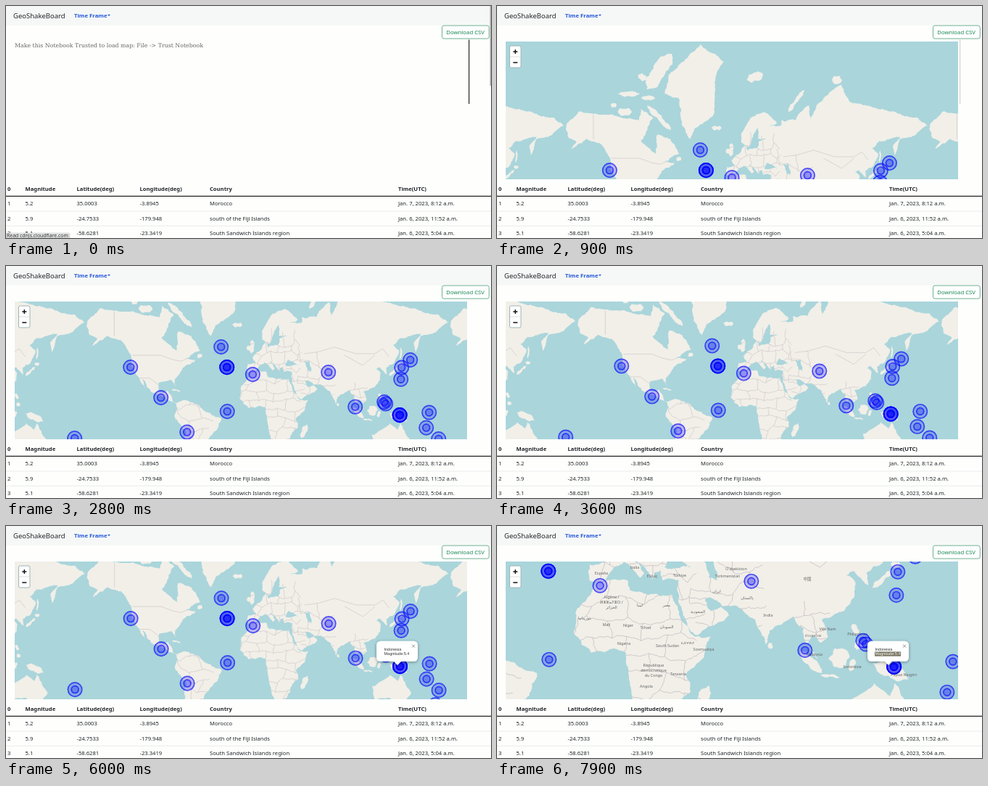
Recreate the animation shown at these times as an HTML page. Size 669 by 320 pixels, loop 8000 ms.

```html
<!DOCTYPE html>
<html lang="en">
<head>
<meta charset="utf-8">
<title>GeoShakeBoard</title>
<style>
html, body { margin: 0; width: 100%; height: 100%; overflow: hidden; background: #fefffd; }
svg { display: block; width: 669px; height: 320px; }
text { font-family: "Noto Sans", "Open Sans", sans-serif; font-size: 7.65px; fill: #212529; white-space: pre; }
.b { font-weight: 700; }
#labels text { font-family: "Noto Sans", "DejaVu Sans", "Noto Sans CJK SC", sans-serif; font-size: 5.4px; fill: #666; text-anchor: middle; }
#popup text { font-family: "Liberation Sans", Arial, sans-serif; font-size: 5.5px; fill: #333; }
</style>
</head>
<body>
<svg viewBox="0 0 669 320">
  <defs>
    <clipPath id="frame"><rect x="12" y="49" width="624" height="190"/></clipPath>
    <clipPath id="picked"><rect id="pick" x="521" y="173.2" width="0" height="6.6"/></clipPath>
    <clipPath id="inland"><use href="#land"/></clipPath>
    <filter id="shade" x="-20%" y="-20%" width="140%" height="150%"><feDropShadow dx="0" dy="1" stdDeviation="2" flood-opacity=".4"/></filter>
    <g id="ring" fill="#00f" fill-opacity=".22" stroke="#00f" stroke-opacity=".65" stroke-width="1.7"><circle r="9.7"/><circle r="4.9"/></g>
    <g id="world">
      <path id="land" fill="#f1efe8"/>
      <path id="borders" clip-path="url(#inland)" fill="none" stroke="#b3a3ad" stroke-opacity=".75" stroke-linejoin="round"/>
      <path id="lakes" fill="#aad5db"/>
    </g>
  </defs>
  <rect width="669" height="320" fill="#fefffd"/>
  <rect width="669" height="26.5" fill="#f6f8f7"/>
  <text x="10" y="17" style="font-size:9.5px">GeoShakeBoard</text>
  <text class="b" x="94" y="16" style="font-size:7.75px;fill:#2457dc">Time Frame</text>
  <path d="M140 11.8h4l-2 2.2z" fill="#2457dc"/>
  <rect x="601.5" y="27" width="64.8" height="18" rx="2.5" fill="#fff" stroke="#4a9c78" stroke-width=".8"/>
  <text x="607.3" y="39" style="font-size:7.75px;fill:#198754">Download CSV</text>
  <g id="table"></g>
  <rect id="scroll" x="638" y="46.5" width="1.3" height="88.5"/>
  <g id="loading">
    <rect x="667.6" width="1.4" height="110" fill="#aaa"/>
    <text x="12" y="57" style="font:7.85px 'DejaVu Serif',serif;fill:#666">Make this Notebook Trusted to load map: File -&gt; Trust Notebook</text>
    <path d="M0 313.2H86q2 0 2 2V320H0z" fill="#e3e5e4" stroke="#b9bbba" stroke-width=".5"/>
    <text x="1" y="319" style="font-size:6.9px;fill:#333">Read cdnjs.cloudflare.com</text>
  </g>
  <g id="map" clip-path="url(#frame)">
    <rect x="12" y="49" width="624" height="190" fill="#aad5db"/>
    <g id="view">
      <g id="tiles"><use href="#world" x="-501.5"/><use href="#world"/><use href="#world" x="501.5"/></g>
    </g>
    <g id="labels"></g>
    <g id="marks"></g>
    <g id="popup">
      <path filter="url(#shade)" fill="#fff" d="M517 158.7h45q6 0 6 6v16q0 6-6 6h-17l-5 5.3-5-5.3h-18q-6 0-6-6v-16q0-6 6-6z"/>
      <path d="M560 163.6l4 4m0-4l-4 4" stroke="#777" stroke-width=".8"/>
      <text x="521.5" y="171.5">Indonesia</text>
      <text x="521.5" y="178.4">Magnitude:5.4</text>
      <g clip-path="url(#picked)">
        <rect x="521" y="173.2" width="36" height="6.6" fill="#77745f"/>
        <text x="521.5" y="178.4" style="fill:#fff">Magnitude:5.4</text>
      </g>
    </g>
    <rect x="17.5" y="55" width="15.5" height="30" rx="2" fill="#fff" stroke="#9fb5b8"/>
    <path d="M18 70h14.5" stroke="#ccc" stroke-width=".6"/>
    <path d="M22.3 63h6M25.3 60v6M22.3 78h6" stroke="#111" stroke-width="1.4"/>
  </g>
</svg>
<script>
const $ = id => document.getElementById(id);
const SIZE = 501.5, R = SIZE / (2 * Math.PI);

// Corner points as "lon,lat"; the coast between them is roughened by rule.
const LAND = {
  africa: '-6,36 10,37 11,33 20,31 32,31 33,28 37,19 43,12 51,12 48,4 39,-6 41,-15 35,-20 33,-27 27,-34 18,-34 12,-17 9,-1 9,4 4,6 -8,4 -17,14 -16,23 -10,30',
  europe: '-9,37 -9,43 -1,44 -4,48 5,53 9,57 11,54 21,55 23,59 30,60 66,61 66,38 36,37 27,37 26,41 23,40 22,37 19,41 13,45 18,40 16,38 8,44 3,42 -1,37',
  nordic: '30,60 22,60 22,65 17,61 13,56 6,58 5,62 15,69 28,71 41,67 33,66 45,66 45,68 68,69 68,57 34,56',
  siberia: '60,69 72,73 74,68 80,73 104,78 113,74 140,72 180,69 190,66 178,62 163,60 157,51 156,57 163,61 142,59 135,55 141,52 135,43 100,38 60,40',
  east: '135,45 128,40 129,35 126,37 122,41 118,39 122,37 122,30 117,24 106,20 109,12 105,9 101,13 99,9 104,1 98,9 97,16 91,22 76,24 76,46',
  south: '92,22 80,15 78,8 73,20 66,25 57,26 50,30 48,29 51,24 56,26 60,22 45,13 43,13 35,28 35,37 45,46 95,46',
  north: '-168,66 -156,71 -128,70 -96,68 -94,72 -82,69 -94,59 -82,53 -79,52 -78,62 -65,60 -56,52 -70,47 -60,46 -70,42 -76,36 -81,31 -80,25 -84,30 -97,28 -97,20 -91,19 -88,21 -84,15 -83,10 -78,8 -85,11 -95,16 -105,20 -113,31 -110,23 -117,33 -124,41 -124,48 -135,58 -148,60 -163,55 -158,59 -166,61',
  latin: '-80,9 -72,12 -60,8 -50,0 -35,-6 -39,-17 -48,-26 -58,-36 -73,-38 -70,-18 -81,-5 -78,4',
  greenland: '-45,60 -40,65 -22,70 -19,80 -12,82 -35,84 -66,80 -70,76 -57,75 -53,66',
  australia: '114,-22 116,-34 131,-32 145,-38 153,-28 142,-11 140,-17 132,-11'
};
const LAKES = ['28,42 31,46 41,42', '47,45 53,45 54,37 50,38'];
// Long islands: two tips, then the width in pixels.
const ISLES = `-88,73 -64,64 7|-117,71 -103,71 10|-124,73 -118,73 6|-88,77 -64,83 20|-96,80 -89,79 9
-117,76 -95,76 6|-94,75 -80,75 5|-59,48 -54,49 5|-24,65 -14,65 6|11,79 27,80 12|52,71 68,77 6|95,79 105,79 10
-5,50 -4,58 6|-8,52 -8,55 5|131,34 141,41 4|140,43 145,43 4|142,46 143,54 2|-84,22 -75,20 2|44,-25 50,-12 7
80,9 81,6 3|121,18 124,13 4|122,7 126,8 5|95,5 106,-6 5|105,-7 115,-8 2|112,-3 117,6 12|120,-5 122,1 4|131,-1 149,-9 8`.split(/[|\n]/);
const LONG_BORDERS = ['-123,49 -95,49 -83,46 -75,45 -68,47', '-117,32 -106,32 -97,26', '-141,70 -141,60',
  '47,50 60,51 77,54 98,50 117,50 125,53 131,48', '87,49 105,42 117,49'];
// Regions with many countries: west, south, east, north, cell size in degrees.
const REGIONS = [[-17, -34, 45, 33, 9], [-9, 38, 42, 60, 6], [42, 16, 78, 46, 9], [90, 10, 108, 27, 6], [-76, -36, -46, 8, 10]];

// Offsets in pixels from 0°,0° at the first zoom level, with a repeat count.
const QUAKES = [
  [-174, -62], [-49, -90], [-41, -62, 3], [-5.4, -52], [-132, -20], [-40.5, -1], [-96, 27.5],
  [-251, 36], [99, -55], [136, -7.4], [176, -14], [178, -11.6], [197.4, 4, 4], [212, -72],
  [200, -61.5], [199, -45.4], [238, .4], [234, 21.5], [251, 37], [246, 57]
];
const LABELS = `España 144 67|Italia 190 59|Ελλάς 214 71|Türkiye 252 70|Oʻzbekiston 330 61|Türkmenistan 318 71
中国 428 75|Algérie / 158 100|ⵍⵣⵣⴰⵢⴻⵔ / 158 107|الجزائر 158 114|ليبيا 197 111|مصر 234 111|موريتانيا 121 129
Mali 151 138|Niger 181 139|Tchad 205 142|السودان 234 141|السعودية 277 120|ایران 303 92|پاکستان 345 101
India 374 125|ประเทศไทย 436 153|Việt Nam 456 144|Nigeria 175 164|South Sudan 235 167|ኢትዮጵያ 263 163
Soomaaliya 285 172|République 216 194|démocratique 216 201|du Congo 216 208|Tanzania 250 206|Angola 206 223
Philippines 497 151|Malaysia 438 179|Indonesia 490 196|Papua Niugini 561 207`.split(/[|\n]/);
const COLS = [2, 26.5, 97.5, 184.5, 281, 541];
const ROWS = [
  ['0', 'Magnitude', 'Latitude(deg)', 'Longitude(deg)', 'Country', 'Time(UTC)'],
  ['1', '5.2', '35.0003', '-3.8945', 'Morocco', 'Jan. 7, 2023, 8:12 a.m.'],
  ['2', '5.9', '-24.7533', '-179.948', 'south of the Fiji Islands', 'Jan. 6, 2023, 11:52 a.m.'],
  ['3', '5.1', '-58.6281', '-23.3419', 'South Sandwich Islands region', 'Jan. 6, 2023, 5:04 a.m.']
];
// Time, then where 0°,0° lies on the stage.
const DRAG = [[1000, 329.4, 288.6], [1700, 341.9, 217.6], [2300, 345.7, 201.6], [3400, 345.7, 201.6], [4300, 346.1, 189.6]];
const FOCUS = [539.35, 193];

let seed = 11;
const random = () => (seed = seed * 16807 % 2147483647) / 2147483647;
const wobble = size => (random() - .5) * size;

const mercator = (lon, lat) => [lon * SIZE / 360, -R * Math.asinh(Math.tan(lat * Math.PI / 180))];
const points = text => text.split(' ').map(pair => mercator(...pair.split(',').map(Number)));
const path = list => 'M' + list.map(p => p.map(v => v.toFixed(2)).join(' ')).join('L');

// Splits an edge at shifted midpoints until the pieces are short.
function rough(a, b) {
  const dx = b[0] - a[0], dy = b[1] - a[1], length = Math.hypot(dx, dy);
  if (length < 2) return [a];
  const shift = wobble(Math.min(.3, 2.5 / length));
  const mid = [a[0] + dx / 2 - dy * shift, a[1] + dy / 2 + dx * shift];
  return [...rough(a, mid), ...rough(mid, b)];
}
const coast = list => path(list.flatMap((p, i) => rough(p, list[(i + 1) % list.length]))) + 'z';

function isle(text) {
  const [from, to, width] = text.split(' ');
  const [a, b] = points(from + ' ' + to);
  const dx = b[0] - a[0], dy = b[1] - a[1], side = width / 2 / Math.hypot(dx, dy);
  const at = (u, s) => [a[0] + dx * u - dy * s, a[1] + dy * u + dx * s];
  // Keeps one winding for all land, so that overlaps stay filled.
  return coast([a, at(.2, side), at(.8, side), b, at(.8, -side), at(.2, -side)].reverse());
}

// Brick mesh with shifted corners, cut off at the coast.
function mesh([west, south, east, north, cell]) {
  const cols = Math.ceil((east - west) / cell), rows = Math.ceil((north - south) / cell);
  const node = Array.from({ length: cols + 1 }, (_, i) => Array.from({ length: rows + 1 }, (_, j) =>
    mercator(west + i * cell + wobble(cell * .7), south + j * cell + wobble(cell * .7))));
  let d = '';
  for (let i = 0; i < cols; i++) {
    for (let j = 0; j < rows; j++) {
      d += path([...rough(node[i][j], node[i + 1][j]), node[i + 1][j]]);
      if ((i + j) % 2) d += path([...rough(node[i][j], node[i][j + 1]), node[i][j + 1]]);
    }
  }
  return d;
}

const each = (list, make) => list.map(make).join('');
$('land').setAttribute('d', each(Object.values(LAND), s => coast(points(s))) + each(ISLES, isle));
$('lakes').setAttribute('d', each(LAKES, s => coast(points(s))));
$('borders').setAttribute('d', each(REGIONS, mesh) + each(LONG_BORDERS, s => path(points(s))));
$('marks').innerHTML = each(QUAKES, ([x, y, n = 1]) => `<use href="#ring" x="${x}" y="${y}"/>`.repeat(n));
$('labels').innerHTML = each(LABELS, s => s.replace(/(.+) (\d+) (\d+)$/, '<text x="$2" y="$3">$1</text>'));
$('table').innerHTML = each(ROWS, (row, r) => each(row, (s, c) =>
  `<text${r ? '' : ' class="b"'} x="${COLS[c]}" y="${255 + r * 20.3}">${s}</text>`)) +
  '<path d="M0 262.4H669" stroke="#222" stroke-width="1.2"/><path d="M0 283H669M0 303.3H669" stroke="#dee2e6" stroke-width=".7"/>';

const ramp = (t, a, b) => Math.min(1, Math.max(0, (t - a) / (b - a)));
const show = (id, on) => $(id).setAttribute('display', on ? 'inline' : 'none');
const fade = (id, v) => $(id).setAttribute('opacity', v);

function origin(t) {
  let [, x, y] = DRAG[0];
  for (let i = 1; i < DRAG.length; i++) {
    const a = DRAG[i - 1], b = DRAG[i];
    const u = ramp(t, a[0], b[0]), e = u * u * (3 - 2 * u);
    x += (b[1] - a[1]) * e;
    y += (b[2] - a[2]) * e;
  }
  return [x, y];
}

function draw(t) {
  const zoom = 2 - (1 - ramp(t, 6200, 6450)) ** 3;
  const settled = t >= 6600;
  const [x, y] = origin(t).map((v, i) => FOCUS[i] + (v - FOCUS[i]) * zoom);
  const place = `translate(${x} ${y}) scale(${zoom})`;
  $('view').setAttribute('transform', place);
  $('marks').setAttribute('transform', place);
  $('ring').setAttribute('transform', `scale(${settled ? .5 : 1})`);
  $('borders').setAttribute('stroke-width', settled ? .35 : .5);
  show('loading', t < 200);
  show('map', t >= 200);
  show('scroll', t < 1000);
  $('scroll').setAttribute('fill', t < 200 ? '#333' : '#d5d7d6');
  fade('tiles', ramp(t, 150, 500));
  fade('labels', ramp(t, 6600, 6900));
  fade('popup', ramp(t, 5550, 5750));
  $('pick').setAttribute('width', 36 * ramp(t, 7100, 7700));
}

const start = performance.now();
function tick() {
  draw((performance.now() - start) % 8000);
  requestAnimationFrame(tick);
}
tick();
</script>
</body>
</html>
```
